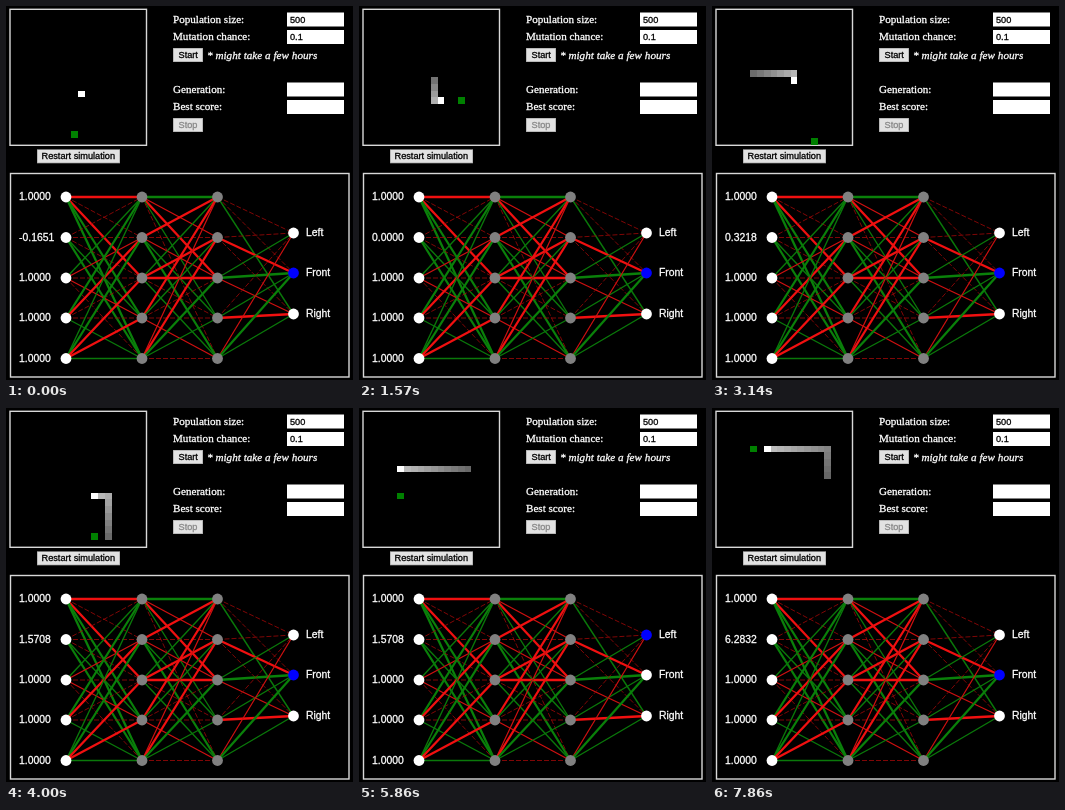
An HTML page with a canvas for the animation above (8 s loop, 347 px wide and 374 px high).

```html
<!DOCTYPE html>
<html lang="en">
<head>
<meta charset="utf-8">
<title>Snake network</title>
<style>
html, body { margin: 0; width: 100%; height: 100%; overflow: hidden; background: #000; }
canvas { display: block; }
</style>
</head>
<body>
<canvas id="stage" width="347" height="374"></canvas>
<script>
const ctx = document.getElementById('stage').getContext('2d');
const SANS = '"Liberation Sans", Arial, sans-serif';
const SERIF = '"Liberation Serif", "Times New Roman", serif';

const LOOP = 8000, FPS = 7, STEPS_PER_FRAME = 3.488;
const CELL = 6.74, GRID = 20, FIELD_X = 4.6, FIELD_Y = 3.8;

// Headings in counter-clockwise order, so +1 is a left turn.
const DIRS = 'RULD';
const DX = [1, 0, -1, 0], DY = [0, -1, 0, 1];
const ANGLE = [0, Math.PI / 2, -Math.PI, -Math.PI / 2];

const ROUTE = 'D4 L1 D2 R9 U9 L8 D4 R4 U12 L9 D8 R6 D10 R3 U7 L7 D6 R11 U10 ' +
  'L13 D4 R12 U2 L2 D1 L2 D4 R2 U3 R1 U7 L11';
const FOODS = [[9, 18], [18, 14], [13, 9], [10, 10], [14, 13], [5, 1], [11, 9],
  [14, 19], [12, 18], [18, 8], [5, 12], [17, 10], [13, 15], [5, 5]];

// Upper case: strong weight, lower case: medium, t: weak negative.
const WEIGHTS = [
  ['RtRGG', 'tttgG', 'grtrt', 'GRttg', 'gGRRg'],
  ['GrRgt', 'RtrgG', 'gRRtg', 'Rgttr', 'rRGgt'],
  ['ttg', 'tRt', 'gGr', 'tgR', 'rGg']
];
const PENS = {
  R: ['#f01010', 2.3], r: ['#d01010', 1.2], t: ['#a00808', 0.8],
  G: ['#0a800a', 2.3], g: ['#0a780a', 1.4]
};
const ROWS = [191, 231.5, 272, 312, 352.5];
const LAYERS = [[60, ROWS], [136, ROWS], [211.5, ROWS], [287.5, [227, 267, 308]]];

const path = [{ x: 10, y: 12, dir: 3, eaten: 0 }];
for (const leg of ROUTE.split(' ')) {
  const dir = DIRS.indexOf(leg[0]);
  for (let i = 0; i < +leg.slice(1); i++) {
    const last = path[path.length - 1];
    const x = last.x + DX[dir], y = last.y + DY[dir];
    const food = FOODS[last.eaten];
    const ate = food && food[0] === x && food[1] === y;
    path.push({ x, y, dir, eaten: last.eaten + (ate ? 1 : 0) });
  }
}

// A hairline outline gives the small type its heavier weight.
function text(str, x, y, font, color = '#fff') {
  ctx.font = font;
  ctx.fillStyle = ctx.strokeStyle = color;
  ctx.lineWidth = 0.3;
  ctx.fillText(str, x, y);
  ctx.strokeText(str, x, y);
}

function box(x, y, w, h, color) {
  ctx.fillStyle = color;
  ctx.fillRect(x, y, w, h);
}

function frame(x, y, w, h) {
  ctx.strokeStyle = '#d8d8d8';
  ctx.lineWidth = 1.4;
  ctx.strokeRect(x, y, w, h);
}

function dot(x, y, color) {
  ctx.fillStyle = color;
  ctx.beginPath();
  ctx.arc(x, y, 5.4, 0, Math.PI * 2);
  ctx.fill();
}

function button(label, x, y, w, textX, color = '#000') {
  box(x, y, w, 14, '#a8a8a8');
  box(x + 0.7, y + 0.7, w - 1.4, 12.6, '#e2e2e2');
  text(label, textX, y + 10, '9.2px ' + SANS, color);
}

function field(label, y, value) {
  text(label, 167, y + 10.3, '11.1px ' + SERIF);
  box(281, y, 57, 14, '#fff');
  text(value, 284, y + 10, '9.2px ' + SANS, '#000');
}

function drawForm() {
  field('Population size:', 6.5, '500');
  field('Mutation chance:', 24, '0.1');
  field('Generation:', 76.5, '');
  field('Best score:', 94, '');
  button('Start', 167, 42, 30, 172.5);
  button('Stop', 167, 112, 30, 172.5, '#888');
  button('Restart simulation', 31, 143.3, 83, 35.5);
  text('* might take a few hours', 201, 52.5, 'italic 11.2px ' + SERIF);
}

// Edges snap to whole pixels so that neighbours join without seams.
function cell(x, y, color) {
  const edge = (start, i) => Math.round(start + i * CELL);
  const left = edge(FIELD_X, x), top = edge(FIELD_Y, y);
  box(left, top, edge(FIELD_X, x + 1) - left, edge(FIELD_Y, y + 1) - top, color);
}

function bodyAt(step) {
  const size = path[step].eaten + 1;
  return path.slice(Math.max(0, step - size + 1), step + 1).reverse();
}

function drawSnake(body, food) {
  frame(4, 3.3, 136.5, 136);
  cell(food[0], food[1], '#008000');
  body.forEach((part, i) => {
    const shade = Math.round(195 - 100 * i / body.length);
    cell(part.x, part.y, i ? `rgb(${shade},${shade},${shade})` : '#fff');
  });
}

// Bias, angle to the food, then whether left, front and right are clear.
function sense(body, food) {
  const head = body[0];
  const angle = Math.atan2(head.y - food[1], food[0] - head.x) - ANGLE[head.dir];
  const clear = [1, 0, 3].map(turn => {
    const d = (head.dir + turn) % 4;
    const x = head.x + DX[d], y = head.y + DY[d];
    const inside = x >= 0 && y >= 0 && x < GRID && y < GRID;
    return inside && !body.some(p => p.x === x && p.y === y) ? 1 : 0;
  });
  return [1, angle, ...clear];
}

function drawNetwork(inputs, choice) {
  frame(4.5, 167.5, 338.5, 203.5);
  WEIGHTS.forEach((layer, k) => {
    const [x1, from] = LAYERS[k], [x2, to] = LAYERS[k + 1];
    layer.forEach((row, i) => [...row].forEach((key, j) => {
      [ctx.strokeStyle, ctx.lineWidth] = PENS[key];
      ctx.setLineDash(key === 't' ? [5, 2] : []);
      ctx.beginPath();
      ctx.moveTo(x1, from[i]);
      ctx.lineTo(x2, to[j]);
      ctx.stroke();
    }));
  });
  ctx.setLineDash([]);

  LAYERS.forEach(([x, ys], k) => ys.forEach((y, i) => {
    const hidden = k === 1 || k === 2;
    dot(x, y, hidden ? '#808080' : k === 3 && i === choice ? '#00f' : '#fff');
  }));
  const font = '10.4px ' + SANS;
  inputs.forEach((v, i) => text(v.toFixed(4), 13, ROWS[i] + 3.3, font));
  ['Left', 'Front', 'Right'].forEach((s, i) => text(s, 300, LAYERS[3][1][i] + 3, font));
}

function draw(time) {
  const n = Math.min(55, Math.floor((time % LOOP + 6) * FPS / 1000));
  const step = Math.round(n * STEPS_PER_FRAME);
  const body = bodyAt(step);
  const food = FOODS[path[step].eaten];
  const turn = (path[step + 1].dir - path[step].dir + 4) % 4;
  const choice = turn === 1 ? 0 : turn === 3 ? 2 : 1;

  box(0, 0, 347, 374, '#000');
  drawForm();
  drawSnake(body, food);
  drawNetwork(sense(body, food), choice);
}

const start = performance.now();
function tick() {
  draw(performance.now() - start);
  requestAnimationFrame(tick);
}
tick();
</script>
</body>
</html>
```
